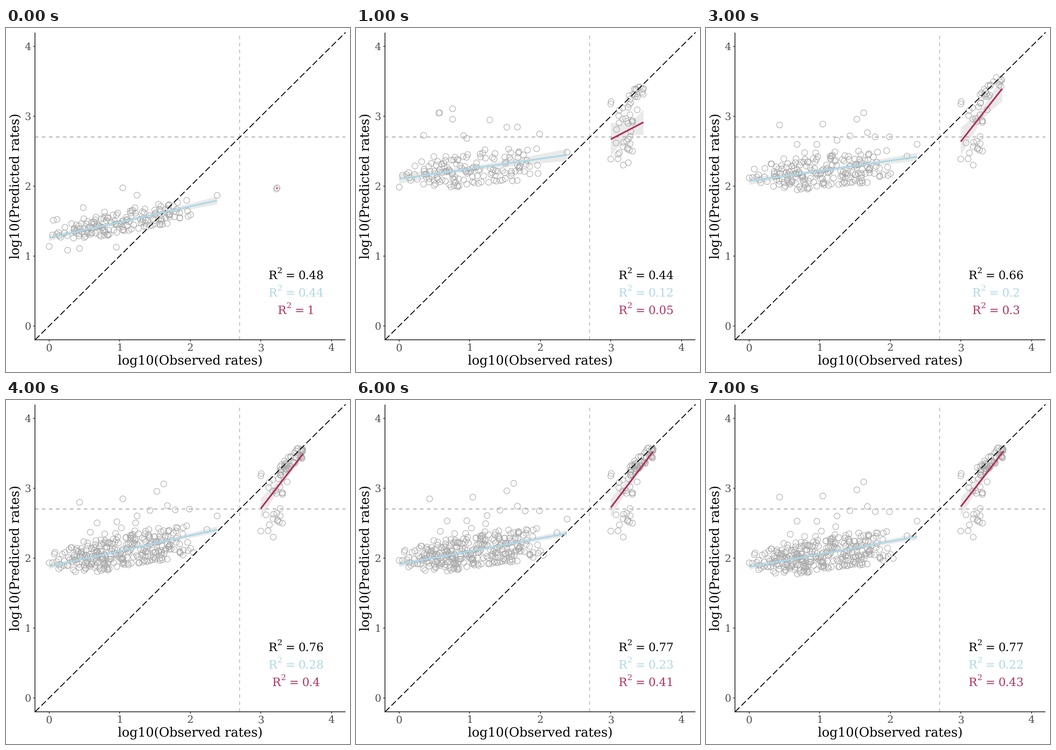
A matplotlib script that plays this animation: 748 by 748 pixels, repeating every 8000 ms.

```python
import numpy as np
import matplotlib.pyplot as plt
from matplotlib.animation import FuncAnimation
from matplotlib.patches import Polygon

SIZE, DPI = 748, 100
PX = 72 / DPI  # points per pixel
BLUE, RED, GREY = "#ADD8E6", "#B03060", "#A9A9A9"
LEFT, RIGHT, TOP, BOTTOM = 63.3, 738.4, 9.5, 678
LOW_X, HIGH_X = 94, 459  # ends of the blue fit

plt.rcParams["font.family"] = "DejaVu Serif"
plt.rcParams["text.hinting"] = "none"


def to_x(v):
    return 94 + 153.4 * v


def to_y(v):
    return 647.5 - 151.9 * v


def diagonal(x):
    return to_y((x - 94) / 153.4)


# Observed values stay the same from step to step; only predictions change.
rng = np.random.default_rng(11)
MAX = 310
cloud_x = np.where(rng.random(MAX) < 0.55,
                   rng.triangular(94, 205, 300, MAX),
                   rng.triangular(230, 340, 412, MAX))
cloud_lift = 72 * rng.beta(1, 1.25, MAX) + 45 * rng.random(MAX) ** 14
tip_x, tip_drop = rng.beta(1.2, 0.9, 50), rng.uniform(-10, 24, 50)
stray_x, stray_drop = rng.triangular(560, 592, 626, 40), rng.random(40)

# Lone points of the left group: x and height above the blue fit.
LONE_FIRST = [(254, 73), (103, 36), (111, 36), (168, 49), (285, 50),
              (459, 11), (240, -53), (160, -38), (94, -19), (134, -36)]
LONE_EARLY = [(147, 87), (180, 131), (182, 131), (210, 136), (210, 113),
              (234, 74), (241, 67), (291, 100), (328, 79), (351, 76),
              (399, 54), (459, 6), (94, -18)]
LONE_LATE = [(160, 125), (254, 112), (328, 112), (343, 125), (351, 76),
             (399, 58), (313, 74), (368, 63), (241, 65), (198, 72),
             (285, 68), (459, 30), (437, 5), (94, 8)]


def left_group(y0, y1, n, spread, lone, reach):
    """Cloud hugging a floor just below the blue fit, plus lone points."""
    fit = lambda x: np.interp(x, [LOW_X, HIGH_X], [y0, y1])
    x = cloud_x[:n]
    floor = np.interp(x, [94, 200, 400], [12, 35, 42])
    thin = np.interp(x, [94, 200], [0.55, 1])
    y = fit(x) + spread * (floor - thin * cloud_lift[:n])
    lone_x, lift = np.transpose(lone)
    return np.column_stack([np.r_[x, lone_x],
                            np.r_[y, fit(lone_x) - reach * lift]])


def right_group(n_tip, n_stray, end):
    """Cluster strung along the diagonal with stragglers below it."""
    if not n_stray:
        return np.array([[588, 350], [589.5, 347.5]])
    x = 590 + (end - 590) * tip_x[:n_tip]
    ceiling = diagonal(end) + 4
    y = ceiling + np.abs(diagonal(x) + tip_drop[:n_tip] - ceiling)
    sx = stray_x[:n_stray]
    sy = diagonal(sx) + (300 - diagonal(sx)) * stray_drop[:n_stray]
    edge = [[554, 165], [555, 160], [554, 285]]
    return np.vstack([np.column_stack([x, y]), np.column_stack([sx, sy]), edge])


# Scores; blue fit y0, y1 and ribbon half-widths at its ends;
# red fit x0, y0, x1, y1 and half-widths; left group; right group.
STEPS = [
    ("0.48 0.44 1", (456, 375, 7, 8.5), (587.5, 347.8, 590.5, 349.2, 0.2, 0.2),
     (165, 0.65, LONE_FIRST, 1), (0, 0, 0)),
    ("0.44 0.12 0.05", (328, 276, 11, 13), (554, 242, 625, 205, 37, 28),
     (150, 1, LONE_EARLY, 1), (14, 36, 626)),
    ("0.54 0.16 0.24", (331, 278, 9, 10), (554, 245, 642, 152, 33, 28),
     (175, 1, LONE_LATE, 0.85), (17, 32, 638)),
    ("0.66 0.2 0.3", (333, 280, 8, 9), (554, 247, 644, 132, 31, 28),
     (205, 1, LONE_LATE, 0.9), (20, 28, 644)),
    ("0.76 0.28 0.4", (362, 282, 5.5, 7), (554, 236, 646, 117, 22, 10),
     (300, 1, LONE_LATE, 1), (46, 28, 646)),
    ("0.77 0.24 0.4", (360, 286, 6, 7), (554, 235, 646, 114, 22, 10),
     (303, 1, LONE_LATE, 1.02), (47, 28, 646)),
    ("0.77 0.23 0.41", (357, 290, 6, 7), (554, 234, 646, 112, 21, 10),
     (306, 1, LONE_LATE, 1.04), (48, 28, 647)),
    ("0.77 0.22 0.43", (363, 297, 6, 7), (554, 232, 647, 111, 20, 9),
     (308, 1, LONE_LATE, 1.12), (49, 28, 647)),
]

fig = plt.figure(figsize=(SIZE / DPI, SIZE / DPI), dpi=DPI, facecolor="white")
ax = fig.add_axes([0, 0, 1, 1])
ax.set(xlim=(0, SIZE), ylim=(SIZE, 0))
ax.axis("off")


def line(xs, ys, color, width, z, **kw):
    return ax.plot(xs, ys, color=color, lw=width * PX, zorder=z,
                   solid_capstyle="butt", dash_capstyle="butt", **kw)[0]


def text(x, y, s, px, color="black", **kw):
    return ax.text(x, y, s, fontsize=px * PX, color=color, va="baseline", **kw)


def draw_frame():
    cut_x, cut_y = to_x(2.7), to_y(2.7)
    line([LEFT, RIGHT], [cut_y, cut_y], GREY, 1.9, 1, ls=(0, (4, 4)))
    line([cut_x, cut_x], [BOTTOM, TOP], "#BEBEBE", 1.9, 1, ls=(0, (4, 4)))
    line([LEFT, RIGHT], [BOTTOM, TOP], "black", 1.93, 3, ls=(0, (7, 3)))
    line([LEFT, LEFT], [TOP, BOTTOM + 0.7], "black", 1.5, 6)
    line([LEFT - 0.7, RIGHT], [BOTTOM, BOTTOM], "black", 1.5, 6)
    for v in range(5):
        x, y = to_x(v), to_y(v)
        line([x, x], [BOTTOM, BOTTOM + 4], "#333333", 1.5, 5)
        line([LEFT - 4, LEFT], [y, y], "#333333", 1.5, 5)
        text(x, 702.5, str(v), 22.2, "#4D4D4D", ha="center")
        text(54.5, y + 8, str(v), 22.2, "#4D4D4D", ha="right")
    text((LEFT + RIGHT) / 2, 732, "log10(Observed rates)", 27.8, ha="center")
    text(29, (TOP + BOTTOM) / 2, "log10(Predicted rates)", 27.8, ha="center",
         rotation=90, rotation_mode="anchor")


class Fit:
    """A regression line in a ribbon that narrows towards its waist."""

    def __init__(self, color):
        self.band = ax.add_patch(Polygon([[0, 0]] * 3, fc="#999999", ec="none",
                                         alpha=0.2, zorder=4))
        self.line = line([], [], color, 3.6, 5)

    def set(self, x0, y0, x1, y1, start, end):
        t = np.linspace(0, 1, 60)
        x, y = x0 + (x1 - x0) * t, y0 + (y1 - y0) * t
        waist, place = 0.24 * (start + end), start / (start + end)
        away = np.where(t < place, (place - t) / place, (t - place) / (1 - place))
        outer = np.where(t < place, start, end)
        half = np.hypot(waist, away * np.sqrt(outer ** 2 - waist ** 2))
        self.band.set_xy(np.column_stack([np.r_[x, x[::-1]],
                                          np.r_[y - half, (y + half)[::-1]]]))
        self.line.set_data([x0, x1], [y0, y1])


class Score:
    """An R-squared label kept centred on one place."""
    EM = 25
    STARTS = 0, 0.753, 1.476, 2.592  # of R, 2, = and the value, in em

    def __init__(self, y, color):
        self.parts = [text(0, y, s, self.EM, color) for s in ("R", "2", "=", "")]
        self.parts[1].set(y=y - 12.5, fontsize=0.7 * self.EM * PX)

    def set(self, value):
        width = self.STARTS[3] + sum(0.318 if c == "." else 0.636 for c in value)
        x = to_x(3.5) - width * self.EM / 2
        for part, start in zip(self.parts, self.STARTS):
            part.set_x(x + start * self.EM)
        self.parts[3].set_text(value)


draw_frame()
dots = ax.scatter([], [], s=(12.8 * PX) ** 2, facecolors="none",
                  edgecolors=GREY, linewidths=1.2 * PX, zorder=2)
blue_fit, red_fit = Fit(BLUE), Fit(RED)
scores = [Score(545.7 + 37.9 * k, c) for k, c in enumerate(("black", BLUE, RED))]


def update(i):
    labels, (y0, y1, start, end), red, left, right = STEPS[i]
    dots.set_offsets(np.vstack([left_group(y0, y1, *left), right_group(*right)]))
    blue_fit.set(LOW_X, y0, HIGH_X, y1, start, end)
    red_fit.set(*red)
    for score, value in zip(scores, labels.split()):
        score.set(value)
    return []


anim = FuncAnimation(fig, update, frames=len(STEPS), interval=1000,
                     repeat=True, repeat_delay=0, init_func=lambda: update(0))
plt.show()
```
